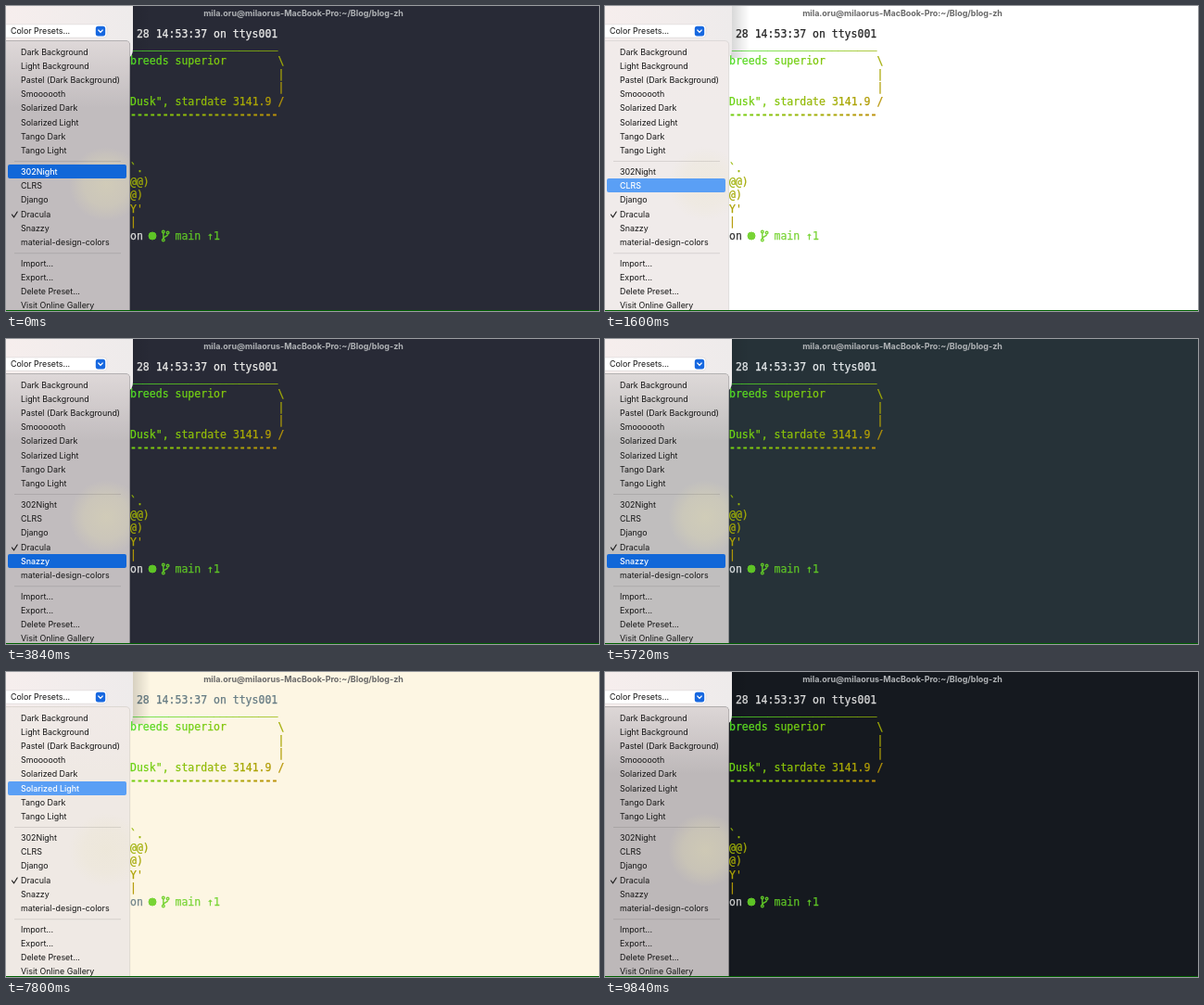
Write an HTML page that moves like this. It is 640 px wide and 329 px high and loops after 9.88 s.

```html
<!DOCTYPE html>
<html lang="en">
<head>
<meta charset="utf-8">
<title>Color presets</title>
<style>
  html, body { margin: 0; width: 100%; height: 100%; overflow: hidden; }
  svg { display: block; width: 640px; height: 329px; }
  text { white-space: pre; }
  .term { font: 11.5px "DejaVu Sans Mono", monospace; stroke-width: .25px; }
  .rule { stroke-width: .8px; }
  .menu { font: 8.9px Inter, sans-serif; fill: #141414; }
  .title { font: 700 8.95px Inter, sans-serif; text-anchor: middle; }
</style>
</head>
<body>
<svg id="stage" viewBox="0 0 640 329">
  <defs>
    <radialGradient id="glow" gradientUnits="userSpaceOnUse" cx="108" cy="192" r="40">
      <stop offset="0" stop-color="#e6e0b0" stop-opacity=".42"/>
      <stop offset=".6" stop-color="#e6e0b0" stop-opacity=".28"/>
      <stop offset="1" stop-color="#e6e0b0" stop-opacity="0"/>
    </radialGradient>
    <linearGradient id="shade">
      <stop offset="0" stop-opacity=".16"/>
      <stop offset="1" stop-opacity="0"/>
    </linearGradient>
    <linearGradient id="pane">
      <stop offset="0" stop-color="#f6eeed"/>
      <stop offset="1" stop-color="#eeebeb"/>
    </linearGradient>
    <linearGradient id="sheen" gradientUnits="userSpaceOnUse" x1="0" y1="37" x2="0" y2="110">
      <stop offset="0" stop-color="#f2ebea" stop-opacity=".6"/>
      <stop offset="1" stop-color="#f2ebea" stop-opacity="0"/>
    </linearGradient>
  </defs>
</svg>
<script>
const LOOP = 9880, COL = 6.93, ROW = 14.53, LEFT = 134;
const stage = document.getElementById('stage');

function add(tag, attrs, text) {
  const el = document.createElementNS('http://www.w3.org/2000/svg', tag);
  for (const key in attrs) el.setAttribute(key, attrs[key]);
  if (text) el.textContent = text;
  return stage.appendChild(el);
}

// name: [background, foreground, is light]
const themes = {
  dracula: ['#282a36', '#ececea'],
  night: ['#151515', '#dedede'],
  clrs: ['#ffffff', '#262626', true],
  django: ['#0b2f20', '#f8f8f8'],
  snazzy: ['#282a36', '#ececea'],
  material: ['#263238', '#e7ebed'],
  tangoLight: ['#ffffff', '#111111', true],
  tangoDark: ['#000000', '#e0e0e0'],
  solarLight: ['#fdf6e3', '#657b83', true],
  solarDark: ['#002b36', '#788c90'],
  smooth: ['#15191f', '#dcdcdc']
};

const themeSteps = [
  [0, 'dracula'], [240, 'night'], [1400, 'clrs'], [2260, 'django'],
  [3120, 'dracula'], [3640, 'snazzy'], [4640, 'material'], [5840, 'snazzy'],
  [6480, 'tangoLight'], [7040, 'tangoDark'], [7680, 'solarLight'],
  [8320, 'solarDark'], [9120, 'smooth']
];

// Menu row under the pointer, -1 for none
const hoverSteps = [
  [0, 8], [1200, 9], [2060, 10], [2920, 11], [3440, 12], [4440, 13],
  [5640, 12], [5880, 11], [6000, 10], [6080, 9], [6160, 8], [6280, 7],
  [6760, 6], [7480, 5], [8120, 4], [8880, 3], [9760, -1]
];

const items = [
  'Dark Background', 'Light Background', 'Pastel (Dark Background)', 'Smoooooth',
  'Solarized Dark', 'Solarized Light', 'Tango Dark', 'Tango Light',
  '302Night', 'CLRS', 'Django', 'Dracula', 'Snazzy', 'material-design-colors',
  'Import...', 'Export...', 'Delete Preset...', 'Visit Online Gallery'
];
const itemY = i => 49.3 + 15.22 * i + (i > 7 ? 7.6 : 0) + (i > 13 ? 7.6 : 0);

// Diagonal rainbow by row and column
function rainbow(row, col) {
  const a = -.3 + (row - 2) * .08 + col / 30;
  const c = k => Math.round(114 + 108 * Math.sin(a + k * Math.PI * 2 / 3));
  return `rgb(${c(0)},${c(1)},${c(2)})`;
}

const rowY = row => 34 + ROW * row;

function art(row, col, str, dy = 0, cls = 'term') {
  [...str].forEach((ch, i) => {
    if (ch === ' ') return;
    const fill = rainbow(row, col + i);
    add('text', { class: cls, x: LEFT + COL * (col + i), y: rowY(row) + dy, fill, stroke: fill }, ch);
  });
}

// Terminal
const back = add('rect', { width: 640, height: 329 });
const title = add('text', { class: 'title', x: 321, y: 10.6 }, 'mila.oru@milaorus-MacBook-Pro:~/Blog/blog-zh');
const header = add('text', { class: 'term', x: LEFT + COL, y: rowY(0) }, '28 14:53:37 on ttys001');

art(1, 0, '_'.repeat(23), -3);
art(2, 0, 'breeds superior', .4);
art(2, 23, '\\', .4);
art(3, 23, '|');
art(4, 23, '|');
art(5, 0, 'Dusk", stardate 3141.9 /');
art(6, 0, '-'.repeat(23), 0, 'term rule');
['`.', '@@)', '@)', "Y'", '|'].forEach((s, i) => art(10 + i, 0, s));

const on = add('text', { class: 'term', x: LEFT, y: rowY(15), opacity: .9 }, 'on');
const green = [
  add('circle', { cx: 158, cy: 248, r: 4 }),
  add('text', { class: 'term', x: LEFT + COL * 7, y: rowY(15) }, 'main ↑1')
];
const branch = add('g', { fill: 'none', 'stroke-width': 1.4 });
branch.append(
  add('path', { d: 'M169.8 244.8V251.5M174.6 246.2C174.6 249 169.8 248 169.8 251.2' }),
  add('circle', { cx: 169.8, cy: 243.5, r: 1.3 }),
  add('circle', { cx: 174.6, cy: 244.6, r: 1.3 }),
  add('circle', { cx: 169.8, cy: 252.6, r: 1.3 })
);

// Settings pane with its pop-up button
const shade = add('rect', { x: 136, width: 20, height: 56, fill: 'url(#shade)' });
add('path', { d: 'M0 0H137V46Q137 54 132 56H0Z', fill: 'url(#pane)' });
add('rect', { x: -6, y: 19.8, width: 115, height: 14.4, rx: 4, fill: '#fff', stroke: '#d5d0d0', 'stroke-width': .6 });
add('text', { class: 'menu', x: 5, y: 30.2 }, 'Color Presets...');
add('rect', { x: 96.8, y: 21.8, width: 10.4, height: 10.6, rx: 2.6, fill: '#1768e0' });
add('path', { d: 'M99.8 26L102 28.3L104.2 26', fill: 'none', stroke: '#fff', 'stroke-width': 1.2, 'stroke-linecap': 'round' });

// Translucent menu
const panel = 'M0 37.5H129Q133.7 37.5 133.7 42.5V329H0Z';
const under = add('path', { d: panel });
add('path', { d: panel, fill: '#ece6e5', 'fill-opacity': .78 });
add('path', { d: panel, fill: 'url(#sheen)' });
const glow = add('path', { d: panel, fill: 'url(#glow)' });
add('path', { d: 'M0 37.5H129Q133.7 37.5 133.7 42.5V329', fill: 'none', stroke: '#000', 'stroke-opacity': .13, 'stroke-width': .7 });
for (const y of [167, 266.3]) add('rect', { x: 9, y, width: 115, height: .9, fill: '#000', opacity: .12 });

const bar = add('rect', { x: 2, width: 128, height: 15, rx: 2 });
const labels = items.map((s, i) => add('text', { class: 'menu', x: 16, y: itemY(i) + 3.2 }, s));
const check = add('path', {
  d: 'M6.4 225L8.6 227.8L12.2 222', fill: 'none', 'stroke-width': 1.1,
  'stroke-linecap': 'round', 'stroke-linejoin': 'round'
});
add('rect', { y: 328, width: 640, height: 1, fill: '#006000' });

function at(steps, t) {
  let value = steps[0][1];
  for (const [start, v] of steps) if (t >= start) value = v;
  return value;
}

function paint(el, color) {
  el.setAttribute('fill', color);
  el.setAttribute('stroke', color);
}

function draw(t) {
  const [bg, fg, light] = themes[at(themeSteps, t)];
  const hover = at(hoverSteps, t);
  const lime = light ? '#78d435' : '#5ec426';

  back.setAttribute('fill', bg);
  under.setAttribute('fill', bg);
  title.setAttribute('fill', light ? '#686868' : '#b0b3b6');
  paint(header, fg);
  paint(on, fg);
  green.forEach(el => paint(el, lime));
  branch.setAttribute('stroke', lime);
  shade.setAttribute('opacity', light ? 1 : .5);
  glow.setAttribute('opacity', light ? .45 : 1);

  bar.setAttribute('visibility', hover < 0 ? 'hidden' : 'visible');
  bar.setAttribute('y', Math.round(itemY(Math.max(hover, 0)) - 7.6));
  bar.setAttribute('fill', light ? '#5a9ff5' : '#1167d8');
  labels.forEach((el, i) => {
    el.style.fill = i === hover ? '#fff' : '';
    el.style.fontWeight = i === hover ? 500 : 400;
  });
  check.setAttribute('stroke', hover === 11 ? '#fff' : '#141414');
}

function frame() {
  draw(performance.now() % LOOP);
  requestAnimationFrame(frame);
}
frame();
</script>
</body>
</html>
```
